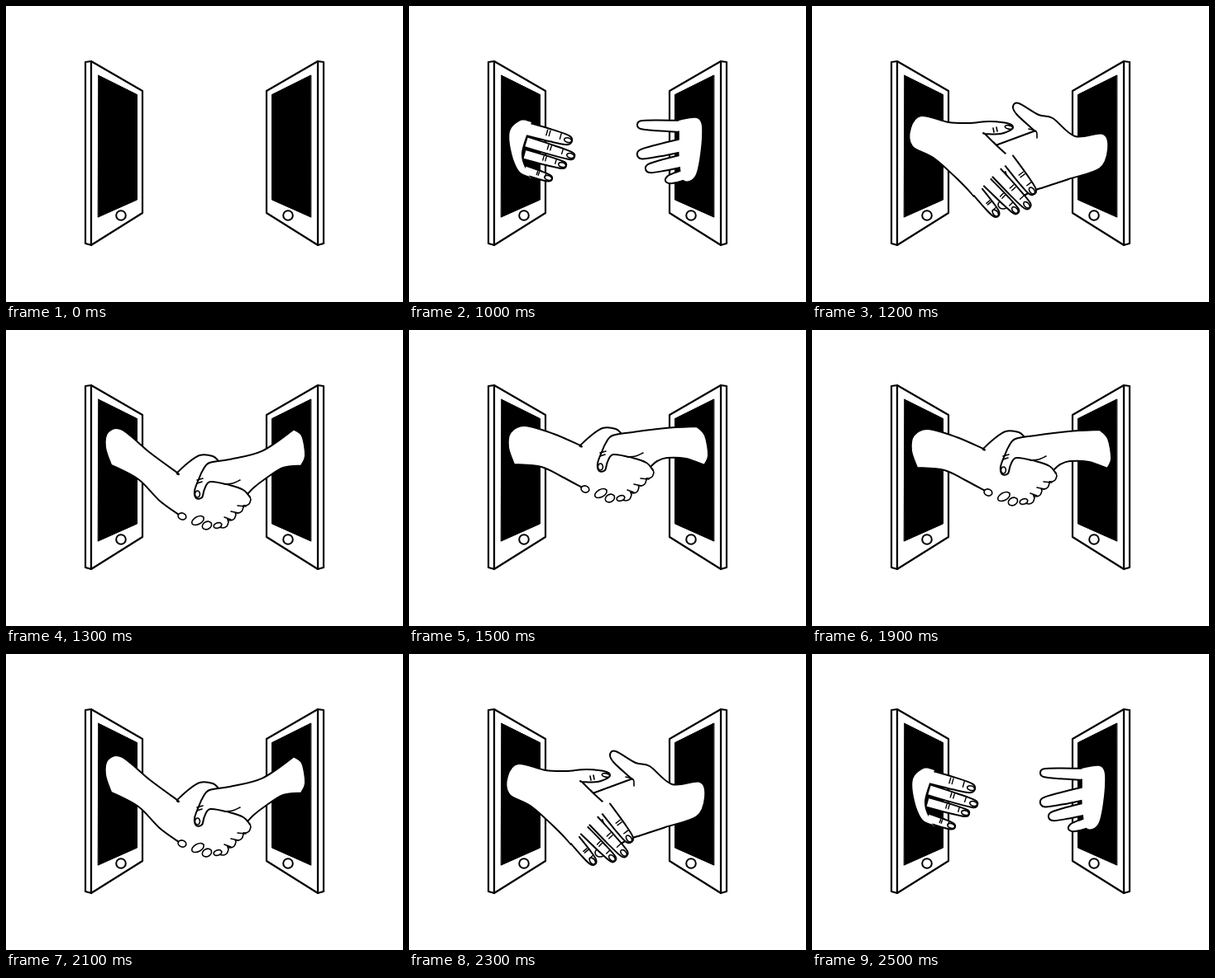
These frames come from a looping animation (480x359 px, 2600 ms). An HTML page with a canvas:

```html
<!DOCTYPE html>
<html lang="en">
<head>
<meta charset="utf-8">
<title>Handshake between phones</title>
<style>
  html, body { margin: 0; width: 100%; height: 100%; overflow: hidden; background: #fff; }
  canvas { display: block; width: 480px; height: 359px; }
</style>
</head>
<body>
<canvas id="stage" width="480" height="359"></canvas>
<script>
const ctx = document.getElementById('stage').getContext('2d');
const LOOP = 2600;
const same = p => p;
let warp = same;

const parse = s => s.trim().split(/\s+/).map(p => p.split(',').map(Number));

// Smooth curve through key points; a repeated point makes a corner.
function curve(points, fill = '#fff', width = 2) {
  const pts = points.map(warp);
  const at = i => pts[Math.max(0, Math.min(pts.length - 1, i))];
  ctx.beginPath();
  ctx.moveTo(...at(0));
  for (let i = 0; i < pts.length - 1; i++) {
    const [a, b, c, d] = [at(i - 1), at(i), at(i + 1), at(i + 2)];
    ctx.bezierCurveTo(
      b[0] + (c[0] - a[0]) / 6, b[1] + (c[1] - a[1]) / 6,
      c[0] - (d[0] - b[0]) / 6, c[1] - (d[1] - b[1]) / 6, c[0], c[1]);
  }
  ctx.fillStyle = fill || 'transparent';
  ctx.fill();
  ctx.lineWidth = width;
  if (width) ctx.stroke();
}

const shape = s => curve(parse(s));
const patch = s => curve(parse(s), '#fff', 0);
const line = s => curve(parse(s), null, 1.6);

// Maps distance along and across an axis to stage coordinates.
const axis = (x, y, a) => (u, v) =>
  [x + u * Math.cos(a) - v * Math.sin(a), y + u * Math.sin(a) + v * Math.cos(a)];

function oval(x, y, rx, ry, turn = 0) {
  const at = axis(x, y, turn);
  curve(Array.from({ length: 9 }, (_, i) =>
    at(rx * Math.cos(i * Math.PI / 4), ry * Math.sin(i * Math.PI / 4))), '#fff', 1.6);
}

// A tapered finger, open at its base; the back view has a nail and knuckle lines.
function finger(x0, y0, x1, y1, w, back = true) {
  const len = Math.hypot(x1 - x0, y1 - y0), turn = Math.atan2(y1 - y0, x1 - x0);
  const at = axis(x0, y0, turn), h = w / 2;
  const side = [[0, h], [len * .55, h * .92], [len - w * .3, h * .7]];
  curve([...side.map(([u, v]) => at(u, -v)), at(len, 0),
         ...side.reverse().map(([u, v]) => at(u, v))]);
  if (!back) return;
  oval(...at(len - 5, 0), 4.6, 2.8, turn);
  for (const k of [.44, .5, .74])
    curve([at(len * k, -h * .7), at(len * k, h * .15)], null, 1.4);
}

const palmFinger = (...f) => finger(...f, false);

function polygon(s, fill) {
  ctx.beginPath();
  parse(s).forEach(p => ctx.lineTo(...p));
  ctx.closePath();
  ctx.fillStyle = fill;
  ctx.fill();
  ctx.stroke();
}

function phone() {
  ctx.lineWidth = 2.2;
  polygon('96,68 103,67 103,290 96,288', '#fff');
  polygon('103,67 165,103 165,251 103,290', '#fff');
  ctx.lineWidth = 1;
  polygon('111.5,84 158.5,107.5 158.5,235 111.5,256', '#000');
  ctx.lineWidth = 2;
  ctx.beginPath();
  ctx.arc(139, 254, 5.8, 0, 7);
  ctx.stroke();
}

function fingersLeft() {
  finger(142, 149, 197, 164, 16);
  finger(142, 165, 200, 183, 13);
  finger(140, 180, 190, 194, 12);
  finger(140, 199, 173, 210, 11);
  patch('148,141 135,139 122,152 124,178 133,200 146,207 146,207 136,180 148,141');
}

function fingersRight() {
  palmFinger(330, 146, 276, 144, 14);
  palmFinger(334, 168, 276, 181, 16);
  palmFinger(334, 187, 286, 198, 15);
  palmFinger(336, 204, 310, 212, 13);
  patch('326,139 350,137 354,160 347,204 332,211 327,185 326,139');
  line('326,152 326,162');
}

function reachRight() {
  shape(`270,152 248,132 243,122 250,118 274,132 291,136 318,158 352,155 358,174 348,197
    310,210 270,223 246,227 222,169 222,169 268,152`);
  line('262,149 271,152 272,160');
  oval(231, 241, 6, 5);
}

function reachLeft() {
  shape(`246,190 222,168 209,155 209,155 228,155 242,149 239,143 215,140 190,142 165,141
    132,133 119,148 121,170 148,185 178,212 196,231`);
  oval(238, 147, 4.8, 2.2, .2);
  line('219,148 220,153');
  line('223,147 224,152');
  finger(237, 186, 269, 228, 15);
  finger(222, 201, 263, 245, 14);
  finger(212, 214, 249, 251, 12);
  finger(201, 226, 225, 255, 13);
  patch('236,178 243,187 228,197 216,209 205,220 195,229 190,212');
}

function clasp() {
  for (let i = 0; i < 4; i++) oval(289 - 9 * i, 173 + 9 * i, 7, 7);
  patch('207,140 247,140 292,165 288,178 262,199 236,205 207,190');
  shape(`257,126 250,120 234,119 219,129 207,140 207,140 175,126 140,116 123,124 120,142
    127,163 127,163 160,166 185,178 209,191`);
  for (let i = 0; i < 3; i++) line(`${290 - 9 * i},${181 + 8 * i} ${280 - 8 * i},${180 + 7 * i}`);
  oval(213, 193, 5, 4, .3);
  oval(232, 198, 8, 4.5, -.5);
  oval(243, 204, 6, 4.5, -.5);
  oval(256, 204, 5, 3.2, -.3);
  shape(`293,165 300,159 312,155 335,156 357,164 357,164 362,152 358,128 348,117 348,117
    310,119 270,124 246,128 238,137 233,148 228,162 230,171 237,170 240,160 247,151
    270,155 287,161 295,170`);
  line('264,154 274,153 283,149');
  oval(231.5, 166, 3, 4);
  line('231,149 238,147');
  line('231,153 237,151');
}

function warped(map, ...parts) {
  warp = map;
  parts.forEach(part => part());
  warp = same;
}

const scaleFrom = (cx, cy, kx, ky) => ([x, y]) => [cx + (x - cx) * kx, cy + (y - cy) * ky];
const ease = v => { v = Math.max(0, Math.min(1, v)); return v * v * (3 - 2 * v); };

// The wrists stay at the screens while the joined hands drop.
const shake = (shift, dip) => ([x, y]) =>
  [x, y + shift + dip * ease((x - 120) / 85) * ease((362 - x) / 70)];

const rest = () => {};
const peek = () => warped(same, fingersLeft, fingersRight);
const meet = () => warped(same, reachRight, reachLeft);
const grip = (shift, dip) => () => warped(shake(shift, dip), clasp);
const extend = () => {
  warped(scaleFrom(354, 172, 1.2, 1.08), fingersRight);
  warped(scaleFrom(118, 158, .75, .82), reachLeft);
};

const steps = [
  [0, rest], [1000, peek], [1100, extend], [1200, meet],
  [1300, grip(0, 33)], [1500, grip(0, 0)], [1700, grip(4, 33)],
  [1900, grip(4, 0)], [2100, grip(4, 33)],
  [2300, meet], [2400, extend], [2500, peek]
];

function render(t) {
  ctx.fillStyle = '#fff';
  ctx.fillRect(0, 0, 480, 359);
  ctx.strokeStyle = '#000';
  ctx.lineJoin = ctx.lineCap = 'round';
  phone();
  ctx.save();
  ctx.translate(480, 0);
  ctx.scale(-1, 1);
  phone();
  ctx.restore();
  steps.filter(([start]) => start <= t).pop()[1]();
}

const begin = performance.now();
function tick() {
  render((performance.now() - begin) % LOOP);
  requestAnimationFrame(tick);
}
tick();
</script>
</body>
</html>
```
